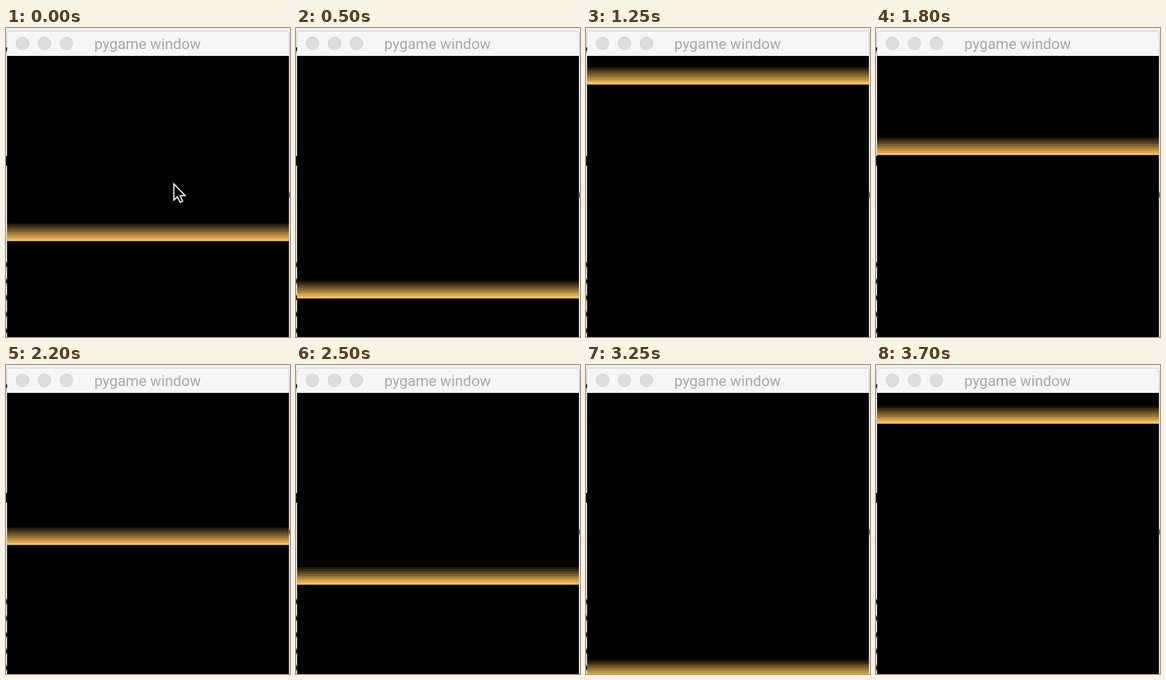
Write an HTML page that moves like this. It is 500 px wide and 543 px high and loops after 3.75 s.

```html
<!DOCTYPE html>
<html lang="en">
<head>
<meta charset="utf-8">
<title>pygame window</title>
<style>
  @property --line { syntax: "<integer>"; inherits: false; initial-value: 0; }

  html, body { margin: 0; width: 100%; height: 100%; overflow: hidden; background: #f1f0f1; }
  .stage { position: relative; width: 500px; height: 543px; overflow: hidden; }
  svg { position: absolute; inset: 0; display: block; }
  text { font: 26px Roboto, "Liberation Sans", sans-serif; fill: #a8a7aa; text-anchor: middle; }

  .screen { position: absolute; left: 2px; top: 49px; width: 496px; height: 494px; overflow: hidden; background: #000; }

  /* Eight fading scan lines on a grid of 128; --line counts down to the lower edge */
  .bar {
    --pitch: 3.875px;
    position: absolute; left: 0; bottom: 100%; width: 100%; height: calc(8 * var(--pitch));
    background: linear-gradient(
      #1f180b 12.5%, #3e3017 0 25%, #5e4822 0 37.5%, #7d602e 0 50%,
      #9c7839 0 62.5%, #bb9045 0 75%, #dba850 0 87.5%, #fac05c 0);
    transform: translateY(calc(var(--line) * var(--pitch)));
    animation: scan 3750ms infinite;
  }
  .cursor { animation: blink 3750ms step-end infinite; }

  /* One 50 ms tick is 1.3333%, about three lines */
  @keyframes scan {
    0%       { --line: 84; animation-timing-function: step-end; }
    1.3333%  { --line: 84; animation-timing-function: steps(9); }
    13.3333% { --line: 110; animation-timing-function: steps(11); }
    27.999%  { --line: 143; animation-timing-function: step-end; }
    28%      { --line: 1; animation-timing-function: steps(4); }
    33.3333% { --line: 13; animation-timing-function: steps(11); }
    48%      { --line: 45; animation-timing-function: steps(25); }
    81.332%  { --line: 120; animation-timing-function: step-end; }
    81.333%  { --line: 117; animation-timing-function: steps(9); }
    93.332%  { --line: 144; animation-timing-function: step-end; }
    93.333%  { --line: 2; animation-timing-function: steps(5); }
    100%     { --line: 17; }
  }
  @keyframes blink {
    0% { visibility: visible; }
    1.3333%, 100% { visibility: hidden; }
  }
</style>
</head>
<body>
<div class="stage">
  <svg width="500" height="543">
    <rect width="500" height="543" fill="#f1f0f1"/>
    <path d="M1.5 60V543M498.5 60V543" stroke="#cbcbcb"/>
    <path d="M1.5 60V12Q1.5 5.5 8 5.5H492Q498.5 5.5 498.5 12V60z" fill="#f7f5f8" stroke="#c9c8ca"/>
    <!-- slivers of the page behind the window -->
    <path d="M0 100.5H2M0 304.5H2M498 304.5H500" stroke="#c4c4c4"/>
    <path d="M0 34h2v4l-2 5zM0 225h2v17h-2z" fill="#111"/>
    <path d="M0 410q4 6 0 12zM0 439q4 6 0 12zM0 468q4 6 0 12zM0 497q4 6 0 12zM0 526q4 6 0 12z" fill="#111"/>
    <path d="M500 287q-3 6 0 13z" fill="#444"/>
    <g fill="#dedcdf" stroke="#d0ced1">
      <circle cx="29" cy="27" r="11.3"/>
      <circle cx="67.7" cy="27" r="11.3"/>
      <circle cx="106.4" cy="27" r="11.3"/>
    </g>
    <text x="249.3" y="37">pygame window</text>
  </svg>
  <div class="screen"><div class="bar"></div></div>
  <svg class="cursor" width="500" height="543">
    <path d="M295.5 274V302.5L302 296.5L306.5 306.5L311 304.5L306.7 294.5H315.5Z" fill="#000" stroke="#fff" stroke-width="2"/>
  </svg>
</div>
</body>
</html>
```
